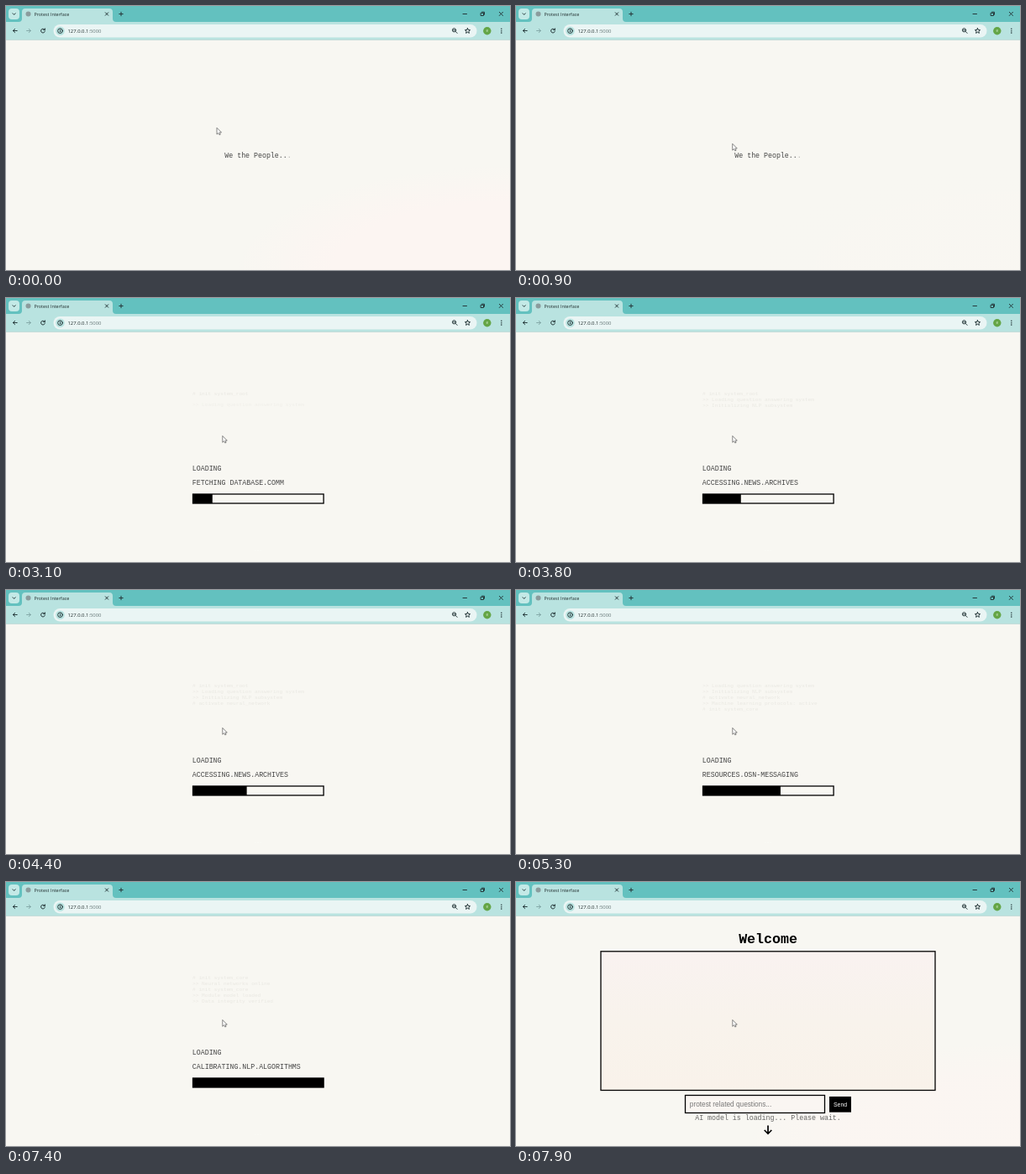
Animation of 600x315 px, one loop 8000 ms. Source, as an HTML page:

```html
<!DOCTYPE html>
<html lang="en">
<head>
<meta charset="utf-8">
<title>Protest Interface</title>
<style>
  html, body { margin: 0; width: 100%; height: 100%; overflow: hidden; background: #f8f7f2; }
  svg { display: block; width: 600px; height: 315px; }
  text { white-space: pre; }
  .mono { font: 8.28px "Courier New", "Liberation Mono", monospace; fill: #444; }
  .ui { font-family: "Open Sans", "Noto Sans", sans-serif; fill: #1f2b2b; }
  .sans { font-family: Arial, "Liberation Sans", sans-serif; }
  .log { font: 6.16px "Courier New", "Liberation Mono", monospace; fill: #e9e8e2; }
  .icon { fill: none; stroke: #26383a; stroke-width: 1; stroke-linecap: round; stroke-linejoin: round; }
</style>
</head>
<body>
<svg viewBox="0 0 600 315">
  <defs>
    <linearGradient id="warm" x1="0" y1="0" x2="0" y2="1">
      <stop offset="0" stop-color="#f9f2f0"/>
      <stop offset=".5" stop-color="#f8f3ec"/>
      <stop offset="1" stop-color="#f9f2ea"/>
    </linearGradient>
    <radialGradient id="blush" cx="1" cy="1" r="1">
      <stop offset="0" stop-color="#fcf5f2"/>
      <stop offset=".65" stop-color="#fcf5f2"/>
      <stop offset="1" stop-color="#fcf5f2" stop-opacity="0"/>
    </radialGradient>
  </defs>

  <rect width="600" height="315" fill="#f8f7f2"/>
  <rect id="glow" y="190" x="274" width="326" height="125" fill="url(#blush)"/>

  <!-- browser window -->
  <rect width="600" height="20" fill="#63c1bf"/>
  <rect y="19" width="600" height="22" fill="#b9e3e0"/>
  <rect y="40" width="600" height="1" fill="#c5dcd9"/>
  <path d="M15 19q4 0 4-4V7q0-4 4-4H123q4 0 4 4v8q0 4 4 4z" fill="#b9e3e0"/>
  <rect x="3" y="3" width="13" height="13" rx="4" fill="#c3e9e6"/>
  <path class="icon" d="M8 8.8l1.6 1.6 1.6-1.6"/>
  <circle cx="26.5" cy="9.5" r="3" fill="#8b9c9d"/>
  <text class="ui" x="33.5" y="11.6" font-size="5.4">Protest Interface</text>
  <path class="icon" d="M118.3 7.8l3.4 3.4m0-3.4l-3.4 3.4M134.8 9.5h4.4m-2.2-2.2v4.4M544 9.5h4.5M587.3 7.3l4.2 4.2m0-4.2l-4.2 4.2M565.5 8.3h3v3.2h-3zM566.5 7.2h3v3"/>
  <path class="icon" d="M13.2 29.5H8.4m2.2-2.2l-2.2 2.2 2.2 2.2"/>
  <path class="icon" style="stroke:#83a9a8" d="M24.6 29.5h4.8m-2.2-2.2l2.2 2.2-2.2 2.2"/>
  <path class="icon" d="M46 28.2a2.4 2.4 0 1 0 .4 1.8M46.4 26.9v1.7h-1.8"/>
  <rect x="56.500" y="22" width="504" height="15.500" rx="7.750" fill="#eaf5f4"/>
  <circle cx="64.5" cy="29.7" r="5.3" fill="#b9e3e0"/>
  <circle class="icon" cx="64.5" cy="29.7" r="2.8" stroke-width=".8"/>
  <path class="icon" d="M64.500 29.500v1.300M64.500 28.100v.1"/>
  <text class="ui" x="73.500" y="31.800" font-size="5.900">127.0.0.1<tspan fill="#667778">:5000</tspan></text>
  <circle class="icon" cx="533.5" cy="28.800" r="2.100"/>
  <path class="icon" d="M535.200 30.500l1.900 1.900M532.600 28.800h1.800"/>
  <path class="icon" stroke-width=".8" d="M549.500 26.500l.9 2 2.200.2-1.700 1.500.5 2.200-1.900-1.200-1.900 1.200.5-2.200-1.700-1.500 2.200-.2z"/>
  <circle cx="572.800" cy="29.800" r="4.700" fill="#64a546"/>
  <text class="ui" x="572.800" y="31.300" font-size="4.500" text-anchor="middle" style="fill:#d9efcf">e</text>
  <g fill="#26383a"><circle cx="589.800" cy="27.300" r=".8"/><circle cx="589.800" cy="29.700" r=".8"/><circle cx="589.800" cy="32.100" r=".8"/></g>

  <!-- opening line -->
  <g id="intro">
    <text class="mono" x="260.300" y="180.700">We the People..<tspan fill-opacity=".4">.</tspan></text>
  </g>

  <!-- loading -->
  <g id="loading">
    <g id="log"></g>
    <text class="mono" x="221.800" y="205.500">LOADING</text>
    <text class="mono" id="task" x="221.800" y="223.300"></text>
    <rect x="222.500" y="234" width="155.600" height="11" fill="none" stroke="#000" stroke-width="1.300"/>
    <rect id="bar" x="222.500" y="234" height="11"/>
  </g>
  <text id="hint" class="mono" x="300" y="302" text-anchor="middle" style="fill:#fdfdfb;font-size:5px">...</text>

  <!-- chat page -->
  <g id="chat">
    <text class="mono" x="300" y="72.500" text-anchor="middle" style="font-size:16.600px;font-weight:bold;fill:#000">Welcome</text>
    <rect x="101" y="82.800" width="398" height="165.700" fill="url(#warm)" stroke="#000" stroke-width="1.300"/>
    <rect x="201.500" y="254.500" width="166" height="21" fill="#faf6f2" stroke="#000" stroke-width="1.300"/>
    <text class="sans" x="206.800" y="268" font-size="8.280" fill="#777">protest related questions...</text>
    <rect x="373" y="256" width="26" height="18.700"/>
    <text class="sans" x="386" y="268" font-size="6.900" text-anchor="middle" fill="#fff">Send</text>
    <text class="mono" x="300" y="283.500" text-anchor="middle" style="fill:#666">AI model is loading... Please wait.</text>
    <path d="M300 290.500v9.500M295.700 296l4.300 4.300 4.300-4.300" fill="none" stroke="#000" stroke-width="1.700"/>
  </g>

  <path id="pointer" d="M0 0v7.800l1.800-1.600 1.200 2.300 1.300-.6-1.100-2.300h2.300z" fill="#fff" stroke="#555" stroke-width=".7"/>
</svg>
<script>
  const LOOP = 8000, STEP = 100;
  const LOAD_AT = 2300, CHAT_AT = 7600;
  const BAR_START = 2360, BAR_TIME = 4950, BAR_WIDTH = 155.6;
  const LOG_START = 2550, LOG_STEP = 500, LOG_ROWS = 5;

  const tasks = [
    [0, "FETCHING DATABASE.COMM"],
    [3600, "ACCESSING.NEWS.ARCHIVES"],
    [4900, "RESOURCES.OSN-MESSAGING"],
    [6200, "CALIBRATING.NLP.ALGORITHMS"]
  ];
  const logLines = [
    "# init system_root",
    ">> Loading question answering system",
    ">> Initializing NLP subsystem",
    "# activate neural_network",
    ">> Machine learning protocols: active",
    "# init system_core",
    ">> Neural networks online",
    "# init system_core",
    ">> Module model loaded",
    ">> Data integrity verified"
  ];

  const $ = id => document.getElementById(id);
  const clamp = v => Math.max(0, Math.min(1, v));
  const easeOut = v => 1 - (1 - clamp(v)) ** 2;
  const show = (id, on) => { $(id).style.display = on ? "" : "none"; };

  const rows = logLines.map(line => {
    const row = document.createElementNS("http://www.w3.org/2000/svg", "text");
    row.setAttribute("class", "log");
    row.setAttribute("x", 222);
    row.textContent = line;
    $("log").append(row);
    return row;
  });

  // New lines rise into place; the oldest drop off the top.
  function drawLog(t) {
    const count = Math.min(rows.length, Math.floor((t - LOG_START) / LOG_STEP) + 1);
    const first = Math.max(0, count - LOG_ROWS);
    rows.forEach((row, i) => {
      const enter = easeOut((t - LOG_START - i * LOG_STEP) / 300);
      row.setAttribute("y", 116 + (i - first) * 7 + 8 * (1 - enter));
      row.setAttribute("opacity", i >= first && i < count ? 0.4 + 0.6 * enter : 0);
    });
  }

  function draw(t) {
    show("intro", t < LOAD_AT);
    show("loading", t >= LOAD_AT && t < CHAT_AT);
    show("chat", t >= CHAT_AT);
    show("hint", t >= 1000 && t < CHAT_AT);
    $("glow").setAttribute("opacity", t >= CHAT_AT ? 0.7 : 1 - clamp(t / 1000));

    const move = easeOut(t / 1000);
    $("pointer").setAttribute("transform", `translate(${251 + 6.8 * move} ${145.3 + 19.2 * move})`);

    $("bar").setAttribute("width", BAR_WIDTH * clamp((t - BAR_START) / BAR_TIME));
    $("task").textContent = tasks.filter(([at]) => t >= at).pop()[1];
    drawLog(t);
  }

  const start = performance.now();
  function tick() {
    const t = (performance.now() - start) % LOOP;
    draw(Math.floor(t / STEP) * STEP);
    requestAnimationFrame(tick);
  }
  tick();
</script>
</body>
</html>
```
